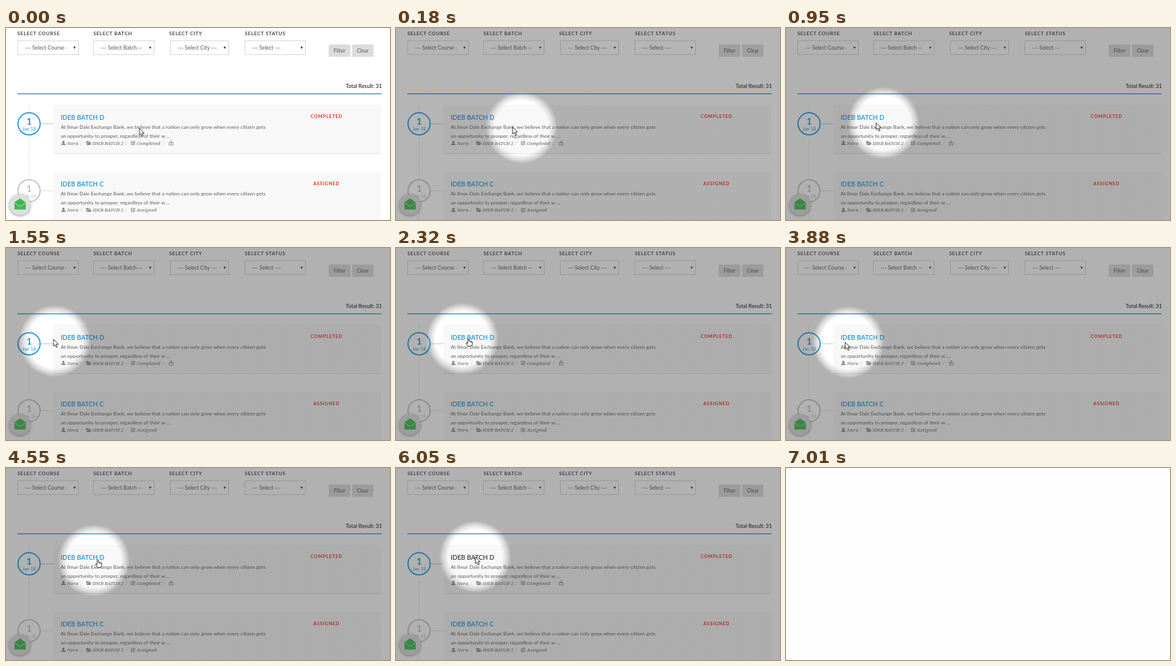
Recreate the animation shown at these times as an HTML page with a canvas. Size 639 by 320 pixels, loop 8 s.

```html
<!DOCTYPE html>
<html lang="en">
<head>
<meta charset="utf-8">
<title>Course results</title>
<style>
html, body { margin: 0; width: 100%; height: 100%; overflow: hidden; background: #fff; }
canvas { display: block; width: 100vw; height: 100vh; }
</style>
</head>
<body>
<canvas id="stage"></canvas>
<script>
const W = 639, H = 320, LOOP = 8000, END = 7010;
const BLUE = '#1c96dc', RED = '#f8221c';
const LATO = 'Lato, sans-serif', SERIF = '"Noto Serif", serif';

const canvas = document.getElementById('stage');
const dpr = window.devicePixelRatio || 1;
canvas.width = W * dpr;
canvas.height = H * dpr;
const g = canvas.getContext('2d');

function text(s, x, y, font, color, { align = 'left', gap = 0 } = {}) {
  g.font = font;
  g.fillStyle = color;
  g.textAlign = align;
  g.letterSpacing = gap + 'px';
  g.fillText(s, x, y);
}

function rect(x, y, w, h, color) {
  g.fillStyle = color;
  g.fillRect(x, y, w, h);
}

function poly(points, fill, stroke, width = 1) {
  g.beginPath();
  points.forEach(([x, y], i) => i ? g.lineTo(x, y) : g.moveTo(x, y));
  if (fill) { g.closePath(); g.fillStyle = fill; g.fill(); }
  if (stroke) { g.strokeStyle = stroke; g.lineWidth = width; g.stroke(); }
}

function disc(x, y, r, fill, stroke, width = 1) {
  g.beginPath();
  g.arc(x, y, r, 0, Math.PI * 2);
  if (fill) { g.fillStyle = fill; g.fill(); }
  if (stroke) { g.strokeStyle = stroke; g.lineWidth = width; g.stroke(); }
}

function dashes(x1, y1, x2, y2, color) {
  g.setLineDash([2, 1.2]);
  poly([[x1, y1], [x2, y2]], null, color, 0.8);
  g.setLineDash([]);
}

function select(x, w, labelX, label, value) {
  text(label, labelX, 12.3, `bold 8px ${LATO}`, '#444', { gap: 0.72 });
  g.strokeStyle = '#d2d2d2';
  g.lineWidth = 1;
  g.strokeRect(x + 0.5, 21.3, w, 23);
  g.save();
  g.beginPath();
  g.rect(x, 22, w - 19, 22);
  g.clip();
  text(value, x + 12.5, 36.3, `8.8px ${LATO}`, '#555');
  g.restore();
  const a = x + w - 6;
  poly([[a - 2, 31.2], [a + 2, 31.2], [a, 35]], '#333');
}

function button(x, w, label) {
  g.fillStyle = '#dcdcdc';
  g.beginPath();
  g.roundRect(x, 27.5, w, 20.5, 1.5);
  g.fill();
  text(label, x + w / 2, 41, `8.6px ${LATO}`, '#555', { align: 'center' });
}

const icons = {
  user(x, y) {
    disc(x + 3.5, y - 5, 2, '#888');
    g.beginPath();
    g.ellipse(x + 3.5, y, 3.6, 3, 0, Math.PI, 0);
    g.fill();
  },
  folder(x, y) {
    poly([[x, y - 1], [x, y - 6.5], [x + 3, y - 6.5], [x + 4, y - 5.5], [x + 7, y - 5.5], [x + 7, y - 4],
      [x + 2, y - 4]], '#888');
    poly([[x + 2.4, y - 3.4], [x + 9, y - 3.4], [x + 7, y], [x + 0.4, y]], '#888');
  },
  check(x, y) {
    poly([[x + 5.5, y - 6], [x + 0.5, y - 6], [x + 0.5, y - 0.5], [x + 6, y - 0.5], [x + 6, y - 3]], null, '#888');
    poly([[x + 2, y - 4], [x + 3.6, y - 2.4], [x + 7.3, y - 6]], null, '#888', 1.3);
  },
  download(x, y) {
    poly([[x + 2, y - 4.5], [x + 0.5, y - 4.5], [x + 0.5, y], [x + 7, y], [x + 7, y - 4.5], [x + 5.5, y - 4.5]], null, '#888');
    poly([[x + 3.8, y - 8], [x + 3.8, y - 4]], null, '#888', 1.2);
    poly([[x + 1.8, y - 4.6], [x + 5.8, y - 4.6], [x + 3.8, y - 2]], '#888');
  }
};

function card(dy, { name, status, statusX, done, titleColor, accent }) {
  const meta = `italic 600 7.3px ${SERIF}`, body = `8.42px ${LATO}`;
  g.save();
  g.translate(0, dy);

  rect(79, 128, 545, 81, '#f8f8f8');
  rect(79, 208.6, 545, 1.2, '#e3e3e3');
  text(name, 91, 152.6, `600 10.7px ${LATO}`, titleColor);
  text(status, statusX, 150.2, `bold 7.4px ${LATO}`, RED, { gap: 0.92 });
  text('At Ilmar Dale Exchange Bank, we believe that a nation can only grow when every citizen gets',
    91, 167.8, body, '#5a5a5a');
  text('an opportunity to prosper, regardless of their w ...', 91, 182.8, body, '#5a5a5a');

  icons.user(92, 195);
  text('Nora', 101.5, 194.8, meta, '#888');
  icons.folder(133.5, 195);
  text('IDEB BATCH 2', 144, 194.8, meta, '#888');
  icons.check(208, 195);
  text(done ? 'Completed' : 'Assigned', 217.5, 194.8, meta, '#888');
  const slashes = done ? [124, 199, 261] : [124, 199];
  slashes.forEach(x => text('/', x, 194.8, meta, '#bbb'));
  if (done) icons.download(271, 195);

  disc(38.4, 159.7, 18.4, '#fff', accent, 1.9);
  dashes(59, 159.7, 79, 159.7, accent);
  text('1', 38.6, 161, `bold 15px ${LATO}`, accent, { align: 'center' });
  text('Jan 18', 38.6, 171, `7.9px ${LATO}`, accent, { align: 'center' });
  g.restore();
}

function mailButton() {
  g.save();
  g.shadowColor = 'rgba(0,0,0,.4)';
  g.shadowBlur = 4 * dpr;
  g.shadowOffsetY = 1.2 * dpr;
  disc(23, 294.5, 17.6, '#dedede');
  g.restore();
  poly([[14, 290.5], [23.4, 284], [32.8, 290.5], [32.8, 302.5], [14, 302.5]], '#3cb950');
  poly([[14, 291.5], [23.4, 297.5], [32.8, 291.5]], null, '#d5e8d7', 0.9);
}

function page(hover) {
  rect(0, 0, W, H, '#fff');
  select(19, 101, 19, 'SELECT COURSE', '--- Select Course ---');
  select(145, 101, 145.5, 'SELECT BATCH', '--- Select Batch ---');
  select(273, 97, 271.5, 'SELECT CITY', '--- Select City ---');
  select(397, 101, 397.5, 'SELECT STATUS', '--- Select ---');
  button(537, 36, 'Filter');
  button(576, 35.5, 'Clear');
  text('Total Result: 31', 625.5, 100, `bold 8.8px ${LATO}`, '#444', { align: 'right' });
  rect(19, 108.9, 606, 1.5, BLUE);
  dashes(38.5, 128, 38.5, H, '#d4d4d4');

  const mix = (a, b) => Math.round(a + (b - a) * hover);
  card(0, {
    name: 'IDEB BATCH D', status: 'COMPLETED', statusX: 507, done: true,
    titleColor: `rgb(${mix(28, 60)},${mix(150, 60)},${mix(220, 60)})`, accent: BLUE
  });
  card(111.6, {
    name: 'IDEB BATCH C', status: 'ASSIGNED', statusX: 511.5, done: false,
    titleColor: BLUE, accent: '#bebebe'
  });
  mailButton();
}

// Pointer path: time, x, y
const path = [
  [0, 222, 167], [180, 194, 165], [310, 186, 162], [760, 174, 159], [950, 150, 158], [1080, 122, 158],
  [1240, 95, 157], [1420, 82, 156], [1550, 79, 152], [1700, 79, 152], [1950, 95, 152], [2190, 120, 151], [2700, 160, 153],
  [2900, 162, 153], [3100, 156, 153], [3300, 140, 155], [3550, 110, 157], [3800, 96, 157], [4020, 108, 157],
  [4290, 135, 156], [4550, 153, 153], [4810, 151, 152], [5340, 132, 148]
];

function pointer(t) {
  const i = path.findIndex(p => p[0] > t);
  if (i === 0) return path[0].slice(1);
  if (i < 0) return path[path.length - 1].slice(1);
  const [t0, x0, y0] = path[i - 1], [t1, x1, y1] = path[i];
  const k = (t - t0) / (t1 - t0);
  return [x0 + (x1 - x0) * k, y0 + (y1 - y0) * k];
}

const early = [0, 20, 180, 310, 460, 760, 950, 1080, 1240];
function recorded(t) {
  if (t < 1420) return early.filter(s => s <= t).pop();
  const [from, step] = t < 3230 ? [1420, 129.2] : [3230, 131.6];
  return from + Math.floor((t - from) / step) * step;
}

const within = (t, a, b) => t >= a && t < b;
const ramp = (t, from, ms) => Math.min(1, Math.max(0, (t - from) / ms));

function spotlight(x, y, shade) {
  const dim = k => `rgba(54,54,54,${shade * k})`;
  const light = g.createRadialGradient(x, y, 45, x, y, 60);
  light.addColorStop(0, dim(0));
  light.addColorStop(0.5, dim(0.42));
  light.addColorStop(1, dim(1));
  rect(0, 0, W, H, light);
}

function arrow(x, y) {
  g.lineJoin = 'miter';
  poly([[x, y], [x, y + 11.5], [x + 2.6, y + 9.2], [x + 4.6, y + 13.6], [x + 6.5, y + 12.8],
    [x + 4.6, y + 8.5], [x + 8, y + 8.3], [x, y]], '#fff', '#111', 0.9);
}

function hand(x, y) {
  g.lineJoin = 'round';
  poly([[x - 1, y + 0.5], [x, y - 0.3], [x + 1, y + 0.5], [x + 1, y + 4], [x + 3, y + 4.2], [x + 5, y + 4.8],
    [x + 6.6, y + 5.8], [x + 6.6, y + 9], [x + 5.4, y + 12.6], [x - 0.6, y + 12.6], [x - 3.6, y + 8],
    [x - 3.2, y + 6.8], [x - 1, y + 8], [x - 1, y + 0.5]], '#fff', '#111', 0.9);
  [3, 5].forEach(d => poly([[x + d, y + 4.5], [x + d, y + 6.6]], null, '#111', 0.7));
}

function draw(now) {
  const t = now % LOOP;
  g.setTransform(canvas.width / W, 0, 0, canvas.height / H, 0, 0);
  if (t >= END) {
    rect(0, 0, W, H, '#fefefe');
  } else {
    const r = recorded(t);
    const hover = ramp(r, 2300, 200) - ramp(r, 3300, 200) + ramp(r, 4600, 200);
    page(hover);
    if (r >= 20) spotlight(...pointer(r - 95), 0.2 + 0.19 * ramp(r, 20, 180));
    const onTitle = within(r, 2180, 3300) || within(r, 4480, 5950);
    (onTitle ? hand : arrow)(...pointer(r));
  }
  requestAnimationFrame(tick);
}

const start = performance.now();
function tick() {
  draw(Math.max(0, performance.now() - start));
}
tick();
</script>
</body>
</html>
```
